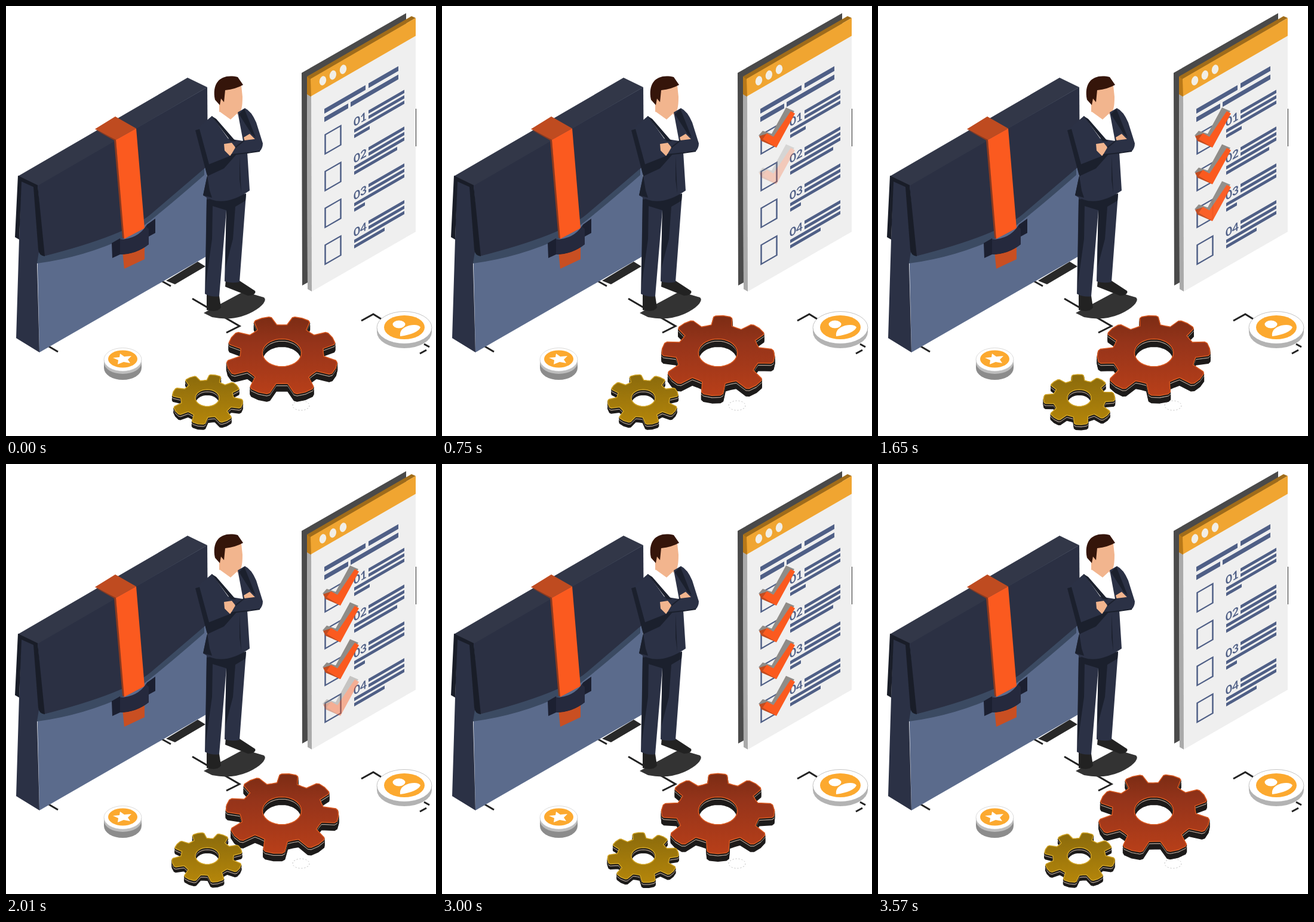
Recreate the animation shown at these times as an HTML page. Size 720x720 px, loop 3600 ms.

```html
<!DOCTYPE html>
<html lang="en">
<head>
<meta charset="utf-8">
<title>Business checklist</title>
<style>
  html, body { margin: 0; width: 100%; height: 100%; overflow: hidden; background: #fff; }
  svg { display: block; width: 720px; height: 720px; }
  text { font: 700 19px Lato, sans-serif; fill: #4f5f86; }
</style>
</head>
<body>
<svg viewBox="0 0 720 720">
  <defs>
    <linearGradient id="red" x2="0" y2="1">
      <stop stop-color="#7c2c14"/><stop offset=".35" stop-color="#96341a"/><stop offset="1" stop-color="#b83f19"/>
    </linearGradient>
    <linearGradient id="gold" x2="0" y2="1">
      <stop stop-color="#8a6a0c"/><stop offset="1" stop-color="#b5860a"/>
    </linearGradient>
    <g id="tick">
      <path fill="#8f8c88" d="M530 217L537 209 552 214 576 170 590 176 556 228Z"/>
      <path fill="#c24c20" d="M531 218L543 214 560 237 535 226Z"/>
      <path fill="#fb5a1f" d="M537 223L544 213 555 219 584 176 591 180 560 237Z"/>
    </g>
  </defs>

  <g id="ground">
    <path fill="#282828" d="M268 460L321 428 334 436 283 466Z"/>
    <path fill="none" stroke="#222" stroke-width="3" d="M258 459L276 469M70 569L87 579M312 490L391 536 369 547M595 527L615 516 628 524M700 566L709 571M693 582L704 576"/>
    <ellipse cx="494" cy="669" rx="14" ry="8" fill="none" stroke="#bbb" stroke-dasharray="2 3"/>
  </g>

  <g id="briefcase">
    <path fill="#5b6b8c" d="M50 300L337 136 336 419 56 580Z"/>
    <path fill="#3b4a62" d="M52 431Q130 421 205 386 242 362 332 283V262L52 400Z"/>
    <path fill="#2b3043" d="M53 300L337 136 338 267 242 349Q200 384 63 419Z"/>
    <path fill="#323748" d="M20 285L304 120 337 136 53 301Z"/>
    <path fill="#2b3145" d="M25 292L47 302 55 412 52 430 56 580 17 556Z"/>
    <path fill="#191d28" d="M20 284L53 300 65 419Q55 418 54 408L46 303 26 294 22 391 15 387Z"/>
    <path fill="#c94f22" d="M194 400L232 384V424L198 440Z"/>
    <path fill="#8a3a20" d="M149 207L181 225 195 388 199 390 184 223Z"/>
    <path fill="#bf4b20" d="M149 206L183 185 218 205 184 224Z"/>
    <path fill="#fb5a1f" d="M184 224L218 205 232 372 198 390Z"/>
    <path fill="#1c2031" d="M177 397L191 389 192 392Q222 392 236 366L250 356V380L239 386V399Q218 416 191 416L178 422Z"/>
    <path fill="#25293d" d="M191 391Q220 390 234 369L239 373V399Q218 415 191 416Z"/>
  </g>

  <g id="man">
    <path fill="#333" d="M331 514L398 478 432 488Q438 493 424 505 390 530 345 521Z"/>
    <path fill="#222" d="M336 482L357 485 360 505Q354 514 336 509ZM368 458L391 460 417 477Q420 484 405 485L367 470Z"/>
    <path fill="#2b3145" d="M336 320L333 482Q345 488 357 486L369 342 366 461Q378 465 391 462L402 315Z"/>
    <path fill="#1b202d" d="M336 324L402 314 401 326 384 336 380 390 367 440 369 342 346 335 345 390 334 470Z"/>
    <path fill="#f2b58e" d="M357 160L368 139 394 133 396 152Q396 179 389 179L384 194 357 182Z"/>
    <path fill="#35150a" d="M350 157C344 126 362 113 388 119L397 132Q385 139 367 141L365 161 360 155 358 166Z"/>
    <path fill="#fff" d="M345 186L358 177 376 190 387 180 398 226 380 225Z"/>
    <path fill="#2b3145" d="M345 184L317 208 337 283 330 317Q362 340 408 309L404 245 425 243Q430 238 430 230L419 195Q411 176 400 171L388 178 397 226 372 222Z"/>
    <path fill="#1b202d" d="M317 208L324 206 340 265 388 246 365 272 337 285ZM337 284L330 317 345 321 341 309ZM344 184L352 189 385 227 376 226ZM399 172L418 220 411 214 390 181ZM391 250L394 314 391 290Z"/>
    <path fill="#f2b58e" d="M365 231L378 229 386 239 375 251 366 242ZM398 220L408 214 417 223 400 227Z"/>
    <path fill="#2b3145" d="M384 237L399 225 424 222Q432 232 426 242L377 249Z"/>
    <path fill="none" stroke="#1b202d" stroke-width="2" d="M377 249L404 246 425 243M384 237L399 225"/>
  </g>

  <g id="sheet">
    <path fill="#4a4a4a" d="M495 112L670 12V30L504 125 505 463 496 468Z"/>
    <path fill="#aaa" d="M504 148L512 152V478L505 474Z"/>
    <path fill="#b87818" d="M504 118L511 122V152L504 148Z"/>
    <path fill="#a06c1a" d="M504 118L679 17 686 20 510 123Z"/>
    <path fill="#efefef" d="M511 151L686 50V378L512 478Z"/>
    <path fill="#f0a531" d="M510 122L686 20V50L511 151Z"/>
    <path stroke="#333" d="M686.5 172V235"/>
    <g fill="#f1eee6">
      <ellipse cx="530.500" cy="125" rx="5.500" ry="8" transform="rotate(15 530 125)"/>
      <ellipse cx="547.500" cy="115.500" rx="5.500" ry="8" transform="rotate(15 547 115)"/>
      <ellipse cx="564.500" cy="106" rx="5.500" ry="8" transform="rotate(15 564 106)"/>
    </g>
    <g id="lines" transform="translate(511 151) skewY(-30)">
      <path stroke="#4f5f86" stroke-width="8" d="M22 38H91M96 38H146M22 52H62M66 52H146"/>
    </g>
  </g>
  <g id="ticks"></g>

  <g id="coins">
    <ellipse cx="195.500" cy="606" rx="31.500" ry="20" fill="#8c8c8c"/>
    <path fill="#8c8c8c" d="M164 592H227V606H164Z"/>
    <ellipse cx="195.500" cy="597" rx="31.500" ry="19" fill="#bdbdbd"/>
    <ellipse cx="195.500" cy="592" rx="31.500" ry="19.500" fill="#fff" stroke="#ccc" stroke-width=".7"/>
    <ellipse cx="195.500" cy="591" rx="24.500" ry="14.500" fill="#fca92f"/>
    <path fill="#fff" d="M191 582L198 587 210 586 204 592 208 598 197 596 187 600 188 593 179 589 190 588Z"/>
    <path fill="#b3b3b3" d="M621 539H713V546A46 27 0 0 1 621 546Z"/>
    <ellipse cx="667" cy="538.500" rx="46" ry="27" fill="#fff" stroke="#aaa" stroke-width=".7"/>
    <ellipse cx="667" cy="538" rx="34" ry="20" fill="#fca92f"/>
    <ellipse cx="658" cy="533" rx="10.500" ry="6.500" fill="#fff"/>
    <path fill="#fff" d="M660 553Q658 540 675 535 690 532 694 538 689 549 660 553Z"/>
  </g>
  <g id="gears"></g>
</svg>
<script>
const LOOP = 3600, STEP = 30, TEETH = 8, TURN = 135;
const byId = id => document.getElementById(id);
const clamp = v => Math.max(0, Math.min(1, v));

function add(parent, tag, attrs, text = '') {
  const el = document.createElementNS('http://www.w3.org/2000/svg', tag);
  for (const key in attrs) el.setAttribute(key, attrs[key]);
  el.textContent = text;
  return parent.appendChild(el);
}

// Checklist rows, each with its own last-line length
const ROW = 61.6;
const ticks = [26, 72, 18, 51].map((last, i) => {
  const row = add(byId('lines'), 'g', { transform: `translate(0 ${i * ROW})`, stroke: '#4f5f86' });
  add(row, 'rect', { x: 23.5, y: 78, width: 26, height: 32, fill: 'none', 'stroke-width': 2.5 });
  add(row, 'path', { 'stroke-width': 5.5, d: `M96 82H156M96 91H156M72 100H156M72 109h${last}` });
  add(row, 'text', { x: 71, y: 92.5, stroke: 'none' }, '0' + (i + 1));
  return add(byId('ticks'), 'use', { href: '#tick', y: i * ROW });
});

// Gear lying on the floor: extruded downwards, seen in slight perspective
function makeGear(g) {
  const group = add(byId('gears'), 'g', { 'fill-rule': 'evenodd', 'stroke-linejoin': 'round' });
  const layer = (dy, fill, stroke, width) =>
    add(group, 'path', { transform: `translate(0 ${dy})`, fill, stroke, 'stroke-width': width });
  for (let dy = g.depth; dy > 4; dy -= 1.5) layer(dy, '#1d1b1a', '#1d1b1a', 2);
  layer(3.5, '#1d1b1a', '#b9a99c', 1.5);
  layer(2, '#1d1b1a', '#1d1b1a', 2);
  layer(0, `url(#${g.paint})`, g.edge, 1.5);
  return { ...g, layers: [...group.children] };
}

function gearPath({ x, y, rx, ry, tilt, hole }, angle) {
  const point = (r, deg) => {
    const a = deg * Math.PI / 180, u = r * Math.sin(a), v = -r * Math.cos(a), k = 1 - tilt * v;
    return (x + rx * u / k).toFixed(2) + ' ' + (y + ry * v / k).toFixed(2);
  };
  const rim = [], bore = [];
  for (let i = 0; i < TEETH; i++) {
    const a = angle + i * 360 / TEETH;
    rim.push(point(.75, a - 15), point(.97, a - 10.5), point(1, a - 8), point(1.01, a),
      point(1, a + 8), point(.97, a + 10.5), point(.75, a + 15), point(.74, a + 22.5));
  }
  for (let a = 0; a < 360; a += 10) bore.push(point(hole, a));
  return `M${rim.join('L')}ZM${bore.join('L')}Z`;
}

const gears = [
  { x: 462, y: 580, rx: 93.5, ry: 66, tilt: .08, hole: .35, depth: 12.5, paint: 'red', edge: '#d9581f', start: 22.5, dir: 1 },
  { x: 337, y: 656, rx: 59, ry: 41.5, tilt: .07, hole: .34, depth: 8.5, paint: 'gold', edge: '#d0a324', start: 14, dir: -1 }
].map(makeGear);

function draw(now) {
  const t = Math.floor(now / STEP) * STEP % LOOP;
  const fadeOut = 1 - clamp((t - 3220) / 330);
  ticks.forEach((tick, i) =>
    tick.setAttribute('opacity', clamp((t - 50 - 590 * i) / 440) * fadeOut));
  for (const g of gears) {
    const d = gearPath(g, g.start + g.dir * TURN * t / LOOP);
    g.layers.forEach(path => path.setAttribute('d', d));
  }
}

const begin = performance.now();
function frame() {
  draw(performance.now() - begin);
  requestAnimationFrame(frame);
}
frame();
</script>
</body>
</html>
```
